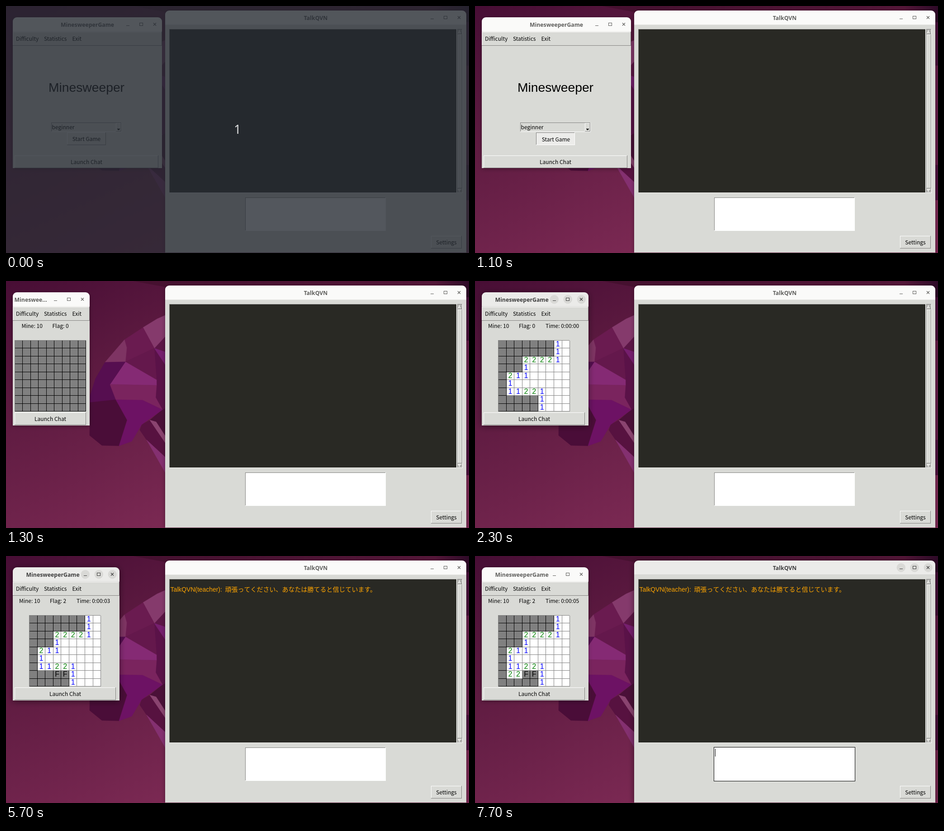
An HTML page with a canvas for the animation above (8000 ms loop, 1024 px wide and 547 px high).

```html
<!DOCTYPE html>
<html lang="en">
<head>
<meta charset="utf-8">
<title>Minesweeper with chat</title>
<style>
html, body { margin: 0; width: 100%; height: 100%; overflow: hidden; background: #5e1c42; }
canvas { display: block; width: 100%; height: 100%; }
</style>
</head>
<body>
<canvas id="stage" width="1024" height="547"></canvas>
<script>
const ctx = document.getElementById('stage').getContext('2d');
const LOOP = 8000;
const UI = '500 12px "Noto Sans CJK JP", "Noto Sans CJK", "Noto Sans", sans-serif';
const TITLE = 'bold 12.3px "Noto Sans", "Open Sans", sans-serif';
const arial = size => `${size}px "Liberation Sans", Arial, sans-serif`;
const FACE = '#d9dad6';
const CELL = 17.55;
const BOT = 'TalkQVN';

const BOARD = [
  '#######1.',
  '#######1.',
  '###22221.',
  '###1.....',
  '#211.....',
  '#1.......',
  '#11221...',
  '#####1...',
  '#####1...'
];

// Facets of the wallpaper figure: colour, then x,y points
const FACETS = [
  ['#571240', '300,318 318,308 352,358 352,390 311,352 296,330'],
  ['#843070', '311,352 352,390 352,424'],
  ['#4a1038', '346,285 352,281 352,346 332,312 318,308'],
  ['#8a4470', '318,308 332,312 352,343 352,358'],
  ['#5a1248', '328,149 352,180 352,282 346,285 331,258 333,219'],
  ['#5c1646', '328,149 352,122 352,160'],
  ['#761f6e', '328,149 352,157 352,185'],
  ['#853a6c', '303,103 334,84 352,76 352,123 328,149'],
  ['#6a1b50', '303,103 328,149 264,179 267,148 262,130'],
  ['#7e3463', '262,130 267,148 264,179 219,180'],
  ['#64184c', '328,149 333,219 264,179'],
  ['#852a74', '264,179 333,219 333,231 230,229'],
  ['#560e50', '219,180 264,179 230,229 243,263 186,269 186,254 198,216'],
  ['#7a245e', '230,229 333,231 331,258 346,285 302,264 243,263'],
  ['#4a0d38', '186,269 243,263 268,308 250,365 212,364 185,342'],
  ['#6d1264', '243,263 302,264 346,285 300,318 278,355 250,365 268,308']
];

function rect(x, y, w, h, color) {
  ctx.fillStyle = color;
  ctx.fillRect(x, y, w, h);
}

function poly(points, color) {
  ctx.beginPath();
  points.split(' ').forEach(p => ctx.lineTo(...p.split(',').map(Number)));
  ctx.closePath();
  ctx.fillStyle = ctx.strokeStyle = color;
  ctx.lineWidth = 0.6;
  ctx.fill();
  ctx.stroke();
}

function text(str, x, y, font = UI, color = '#000', align = 'left') {
  ctx.font = font;
  ctx.fillStyle = color;
  ctx.textAlign = align;
  ctx.fillText(str, x, y);
}

// One-pixel border: light on the top left, dark on the bottom right
function bevel(x, y, w, h, light = '#fff', dark = '#828280') {
  rect(x, y, w, 1, light);
  rect(x, y, 1, h, light);
  rect(x, y + h - 1, w, 1, dark);
  rect(x + w - 1, y, 1, h, dark);
}

function button(label, x, y, w, h, { fill = FACE, pressed = false } = {}) {
  rect(x, y, w, h, fill);
  if (pressed) bevel(x, y, w, h, '#828280', '#fff');
  else bevel(x, y, w, h);
  const shift = pressed ? 1 : 0;
  text(label, x + w / 2 + shift, y + h / 2 + 4.5 + shift, UI, '#000', 'center');
}

function wallpaper() {
  const g = ctx.createLinearGradient(60, -20, 330, 560);
  g.addColorStop(0, '#480e35');
  g.addColorStop(0.45, '#601c42');
  g.addColorStop(1, '#7b2953');
  rect(0, 0, 1024, 547, g);
  const top = ctx.createLinearGradient(280, 0, 1024, 0);
  top.addColorStop(0, '#45102f');
  top.addColorStop(0.9, '#541638');
  top.addColorStop(1, '#2e0a28');
  poly('282,0 1024,0 1024,36 352,13', top);
  rect(1017, 36, 7, 96, '#48113a');
  rect(1017, 132, 7, 220, '#651d48');
  rect(1017, 352, 7, 78, '#4e123e');
  FACETS.forEach(([color, points]) => poly(points, color));
}

function frame(x, y, right, bottom, title, focused, titleX) {
  const w = right - x;
  ctx.save();
  ctx.shadowColor = focused ? 'rgba(0,0,0,.5)' : 'rgba(0,0,0,.35)';
  ctx.shadowBlur = focused ? 14 : 9;
  ctx.shadowOffsetY = 2;
  ctx.beginPath();
  ctx.roundRect(x, y, w, bottom - y, [9, 9, 0, 0]);
  ctx.fillStyle = focused ? '#ebebe9' : '#fafaf9';
  ctx.fill();
  ctx.restore();
  rect(x, y + 32, w, bottom - y - 32, FACE);
  rect(x, y + 31, w, 1, focused ? '#d2d2cf' : '#e6e6e3');

  const ink = focused ? '#3d3d3d' : '#5e5e5c';
  if (titleX) text(title, titleX, y + 20.5, TITLE, ink);
  else text(title, x + w / 2, y + 20.5, TITLE, ink, 'center');
  controls(right, y + 16, focused, ink);
}

function controls(right, cy, focused, ink) {
  const [min, max, close] = [76, 46, 16].map(d => right - d);
  if (focused) {
    for (const cx of [min, max, close]) {
      ctx.beginPath();
      ctx.arc(cx + 0.3, cy - 0.3, 9.7, 0, Math.PI * 2);
      ctx.fillStyle = '#d9d9d6';
      ctx.fill();
    }
  }
  ctx.strokeStyle = ink;
  ctx.lineWidth = 1;
  rect(min - 3, cy + 2, 7, 1, ink);
  ctx.strokeRect(max - 3.5, cy - 3.5, 7, 6);
  ctx.lineWidth = 1.2;
  ctx.beginPath();
  ctx.moveTo(close - 3, cy - 3.5);
  ctx.lineTo(close + 3, cy + 2.5);
  ctx.moveTo(close + 3, cy - 3.5);
  ctx.lineTo(close - 3, cy + 2.5);
  ctx.stroke();
}

function menu(right) {
  bevel(15, 57, right - 15, 31);
  text('Difficulty', 22, 77);
  text('Statistics', 84, 77);
  text('Exit', 146.5, 77);
}

function startWindow(t) {
  frame(15, 25, 345, 359, 'MinesweeperGame', false);
  menu(345);
  text('Minesweeper', 178, 189.5, arial(28.25), '#000', 'center');

  bevel(100, 258, 156, 21, '#828280', '#fff');
  text('beginner', 101.5, 273);
  bevel(243, 259, 12, 19);
  poly('246,272 252,272 249,275', '#000');

  button('Start Game', 135, 280, 86, 28, {
    fill: t < 100 ? FACE : '#ececea',
    pressed: t >= 1100
  });
  button('Launch Chat', 19, 331, 318, 28);
}

function cellAt(row, col, t) {
  if (t < 2200) return '#';
  if (row === 7) {
    if ((col === 3 || col === 4) && t >= 5700) return 'F';
    if (col === 2 && t >= 5900) return '2';
    if (col === 1 && t >= 6500) return '2';
  }
  return BOARD[row][col];
}

function board(left, t) {
  const top = 131;
  const edge = (origin, i) => Math.floor(origin + i * CELL);
  const inks = { 1: '#0000ff', 2: '#008000', F: '#000' };
  for (let row = 0; row < 9; row++) {
    for (let col = 0; col < 9; col++) {
      const mark = cellAt(row, col, t);
      const hidden = mark === '#' || mark === 'F';
      const x = edge(left, col) + 1, y = edge(top, row) + 1;
      const w = edge(left, col + 1) + 1 - x, h = edge(top, row + 1) + 1 - y;
      rect(x, y, w, h, hidden ? '#000' : '#808080');
      rect(x, y, w - 1, h - 1, hidden ? '#808080' : '#fff');
      if (inks[mark]) {
        text(mark, left + (col + 0.5) * CELL, y + 13.3, arial(16), inks[mark], 'center');
      }
    }
  }
  rect(edge(left, 0), top, 1, 158, '#808080');
  rect(edge(left, 0), top, 158, 1, '#808080');
}

function gameWindow(t) {
  const wide = t >= 2300;
  const right = wide ? 251 : 185;
  const focused = t >= 2200 && t < 7500;
  if (wide) frame(15, 25, right, 320, 'MinesweeperGame', focused, 44.5);
  else frame(15, 25, right, 320, 'Mineswee…', focused, 18.5);
  menu(right);
  text('Mine: 10', wide ? 29 : 34.5, 103.5);
  text('Flag: ' + (t >= 5700 ? 2 : 0), wide ? 97 : 102.5, 103.5);
  if (wide) {
    const seconds = t < 5700 ? 0 : 3 + Math.floor((t - 5700) / 1000);
    text('Time: 0:00:0' + seconds, 156, 103.5);
  }
  board(wide ? 51.6 : 19, t);
  button('Launch Chat', 19, 291, right - 27, 28);
}

function scrollbar() {
  rect(998, 51, 12, 363, '#b4b4b1');
  bevel(998, 51, 12, 363, '#828280', '#fff');
  rect(999, 63, 10, 341, FACE);
  bevel(999, 63, 10, 341);
  poly('1003.5,53 1008,61 999.5,61', FACE);
  poly('999.5,405 1008,405 1003.5,412', FACE);
  ctx.lineWidth = 1;
  ctx.strokeStyle = '#828280';
  ctx.beginPath();
  ctx.moveTo(1003.5, 53);
  ctx.lineTo(1008, 61.5);
  ctx.lineTo(999.5, 61.5);
  ctx.moveTo(1008, 405);
  ctx.lineTo(1003.5, 412);
  ctx.stroke();
  ctx.strokeStyle = '#fff';
  ctx.beginPath();
  ctx.moveTo(999.5, 61);
  ctx.lineTo(1003.5, 53);
  ctx.moveTo(1003.5, 412);
  ctx.lineTo(999.5, 405.5);
  ctx.lineTo(1008, 405.5);
  ctx.stroke();
}

function chatWindow(t) {
  const focused = t >= 7500;
  frame(352, 10, 1018, 546, BOT, focused);
  rect(361, 51, 636, 363, '#292924');
  bevel(361, 51, 636, 363, '#828280', '#f4f4f2');
  scrollbar();

  if (t >= 5700) {
    text(BOT + '(teacher):', 363.5, 79, arial(13.9), '#ffa500');
    text('頑張ってください、あなたは勝てると信じています。', 484.5, 79,
      '14px "Noto Sans CJK JP", "Noto Sans CJK", sans-serif', '#ffa500');
  }

  if (focused) rect(528, 423, 313, 76, '#000');
  rect(529, 424, 311, 74, '#fff');
  if (focused) rect(531, 427, 1, 17, '#000');
  else bevel(529, 424, 311, 74, '#828280', '#fff');
  button('Settings', 940, 509, 68, 28);
}

function draw(t) {
  wallpaper();
  chatWindow(t);
  if (t < 1300) startWindow(t);
  else gameWindow(t);
  if (t < 100) {
    rect(0, 0, 1024, 547, 'rgba(36,41,49,.785)');
    text('1', 512, 283, '27px "Noto Sans", "Open Sans", sans-serif', '#dedfe0', 'center');
  }
}

const start = performance.now();
function tick() {
  draw((performance.now() - start) % LOOP);
  requestAnimationFrame(tick);
}
tick();
</script>
</body>
</html>
```
